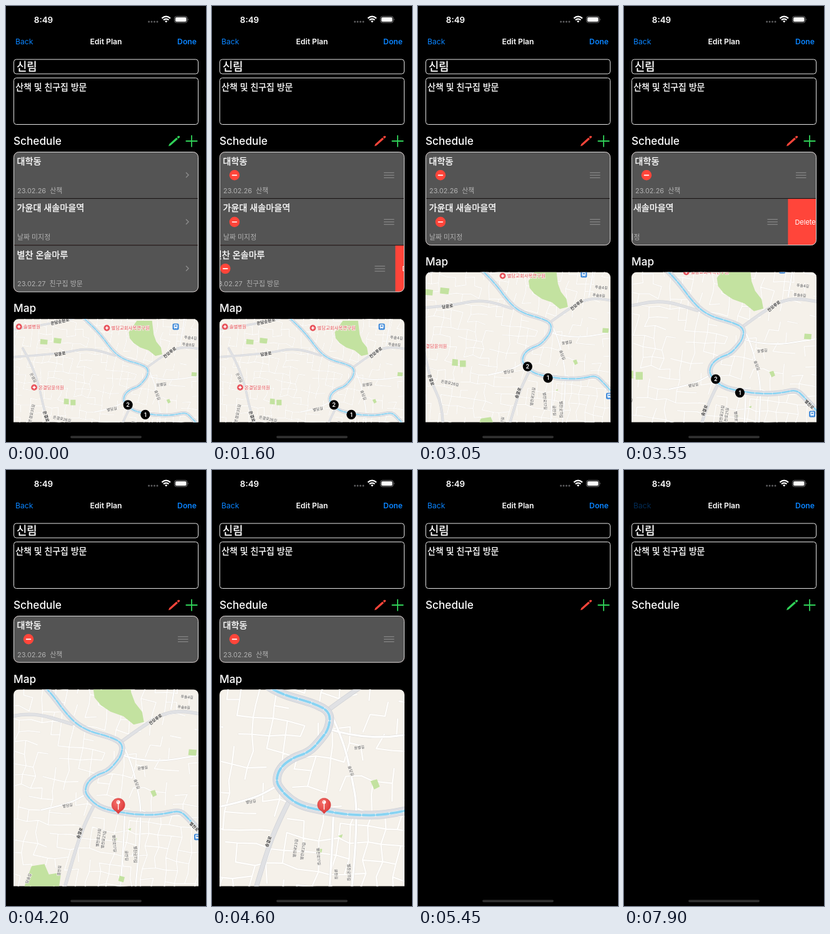
Recreate the animation shown at these times as an HTML page. Size 320x694 px, loop 8000 ms.

```html
<!DOCTYPE html>
<html lang="ko">
<head>
<meta charset="utf-8">
<style>
  html, body { margin: 0; width: 100%; height: 100%; overflow: hidden; background: #000; }
  svg { display: block; width: 100%; height: 100%; }
  text { font-family: Inter, "Noto Sans CJK KR", "Noto Sans CJK", sans-serif; fill: #fff; white-space: pre; }
  .bar { font-size: 12.2px; }
  .blue { fill: #0a84ff; }
  .bold { font-weight: 600; }
  .heading { font-size: 17.2px; font-weight: 500; }
  .medium { stroke: #fff; stroke-width: 0.35px; }
  .title { font-size: 14.1px; }
  .detail { font-size: 10.9px; fill: #b2b2b2; }
  .field { fill: none; stroke: #e4e4e4; }
  .lines { fill: none; stroke-linejoin: round; stroke-linecap: round; }
  .label text { font-size: 6px; fill: #55565a; text-anchor: middle; paint-order: stroke; stroke: #f8f5ef; stroke-width: 1.4px; }
  .label .major { font-size: 6.6px; font-weight: 600; fill: #3c3d40; }
  .label .place { font-size: 7.4px; font-weight: 500; text-anchor: start; }
</style>
</head>
<body>
<svg viewBox="0 0 320 694">
  <defs>
    <clipPath id="viewport"><rect width="320" height="662.5"/></clipPath>
    <clipPath id="cardClip"><rect class="cardBox" x="12.5" y="232.5" width="295" rx="8"/></clipPath>
    <clipPath id="mapClip"><rect id="mapBox" x="12" width="296" height="372" rx="8"/></clipPath>
    <radialGradient id="balloonFill" cx=".4" cy=".3" r=".8">
      <stop offset="0" stop-color="#f4706a"/><stop offset="1" stop-color="#d92f30"/>
    </radialGradient>
  </defs>
  <rect width="320" height="694"/>

  <text x="60" y="26.6" font-size="13.4" text-anchor="middle" class="bold">8:49</text>
  <g fill="#5c5c5e">
    <circle cx="228.6" cy="25" r="1.5"/><circle cx="233" cy="25" r="1.5"/>
    <circle cx="237.5" cy="25" r="1.5"/><circle cx="242" cy="25" r="1.5"/>
  </g>
  <g fill="none" stroke="#fff" stroke-width="2.1">
    <path d="M249.4 19.6Q256.2 13.8 263 19.6M251.9 22.3Q256.2 18.8 260.5 22.3"/>
    <path d="M254 23.9Q256.2 22.4 258.4 23.9L256.2 26.5Z" fill="#fff" stroke="none"/>
  </g>
  <rect x="269.5" y="16.5" width="20.5" height="10" rx="3.2" fill="none" stroke="#7b7b7d"/>
  <rect x="271" y="18" width="17.5" height="7" rx="1.8" fill="#fff"/>
  <path d="M291.3 19.8Q293 21.5 291.3 23.2Z" fill="#7b7b7d"/>

  <text id="back" x="15" y="61" class="bar blue">Back</text>
  <text x="160" y="61" text-anchor="middle" class="bar bold">Edit Plan</text>
  <text x="305" y="61" text-anchor="end" class="bar bold blue">Done</text>

  <rect class="field" x="12.5" y="85" width="295" height="23" rx="4"/>
  <text x="17" y="102.8" font-size="17.7" class="medium">신림</text>
  <rect class="field" x="12.5" y="114.5" width="295" height="74" rx="4"/>
  <text x="15.3" y="134.2" font-size="13.9" class="medium">산책 및 친구집 방문</text>

  <text x="12" y="221" class="heading">Schedule</text>
  <path id="pencil" d="M260 223.2L261.2 219.8L272.6 209.4L275 211.8L263.4 222ZM273.5 208.6L275.4 207Q277 206.2 278 207.6Q278.6 209 277.6 209.6L275.9 211Z"/>
  <path d="M288.3 215H305.7M297 206.3V223.7" stroke="#30d158" stroke-width="1.8" stroke-linecap="round"/>

  <g id="content" clip-path="url(#viewport)">
    <g id="rows" clip-path="url(#cardClip)"></g>
    <rect class="cardBox" x="12.5" y="232.5" width="295" rx="8" fill="none" stroke="#dcdcdc"/>
    <text id="mapHeading" x="12" class="heading">Map</text>
    <g clip-path="url(#mapClip)">
      <rect width="320" height="694" fill="#f5f1ea"/>
      <g id="terrain"></g>
      <g id="labels"></g>
      <g id="pins"></g>
    </g>
  </g>
  <rect x="103" y="684.3" width="114" height="3.6" rx="1.8" fill="#303030"/>
</svg>

<script>
const LOOP = 8000, ROW_HEIGHT = 74.4, CARD_TOP = 232, DELETE_WIDTH = 56;
const RED = '#ff453a', GREEN = '#30d158';
const $ = id => document.getElementById(id);
const clamp = v => Math.min(1, Math.max(0, v));
const easeInOut = v => (1 - Math.cos(Math.PI * clamp(v))) / 2;
const spring = ms => { const k = Math.max(0, ms) * 0.014; return 1 - (1 + k) * Math.exp(-k); };

function add(parent, tag, attrs, text = '') {
  const node = document.createElementNS('http://www.w3.org/2000/svg', tag);
  for (const key in attrs) node.setAttribute(key, attrs[key]);
  node.textContent = text;
  return parent.appendChild(node);
}
const move = (node, x, y, angle = 0) =>
  node.setAttribute('transform', `translate(${x.toFixed(2)} ${y.toFixed(2)}) rotate(${angle})`);
const show = (node, visible) => node.setAttribute('display', visible ? 'inline' : 'none');

// ---- Schedule rows ----
const rows = [
  { title: '대학동', detail: '23.02.26  산책', swipe: 4760, remove: 5450 },
  { title: '가윤대 새솔마을역', detail: '날짜 미지정', swipe: 3330, remove: 4000 },
  { title: '별찬 온솔마루', detail: '23.02.27  친구집 방문', swipe: 1530, remove: 2350 },
];
rows.forEach((row, i) => {
  row.node = add($('rows'), 'g', {});
  move(row.node, 0, CARD_TOP + i * ROW_HEIGHT);
  add(row.node, 'rect', { x: 12, width: 296, height: ROW_HEIGHT, fill: RED });
  row.body = add(row.node, 'g', {});
  add(row.body, 'rect', { x: 12, width: 296, height: ROW_HEIGHT, fill: '#545454' });
  add(row.body, 'text', { x: 17.5, y: 20, class: 'title medium' }, row.title);
  add(row.body, 'text', { x: 18, y: 65.5, class: 'detail' }, row.detail);
  row.chevron = add(row.body, 'path', { d: 'M288 33L292 37L288 41', fill: 'none', stroke: '#8c8c8c', 'stroke-width': 1.4 });
  row.minus = add(row.body, 'g', {});
  add(row.minus, 'circle', { cx: 36, cy: 37.3, r: 8.2, fill: RED });
  add(row.minus, 'rect', { x: 31.8, y: 36.5, width: 8.4, height: 1.7, rx: 0.8, fill: '#fff' });
  row.handle = add(row.body, 'path', { d: 'M275 33.3H291.5M275 37.3H291.5M275 41.3H291.5', stroke: '#858585', 'stroke-width': 1.2 });
  row.delete = add(row.node, 'text', { x: 319, y: 41.3, 'font-size': 11 }, 'Delete');
  if (i) add(row.node, 'rect', { x: 12, y: -0.5, width: 296, height: 1, fill: '#111' });
});

// ---- Map terrain ----
function smooth(points) {
  let d = `M${points[0]}`;
  for (let i = 1; i < points.length - 1; i++) {
    const [x, y] = points[i], [nx, ny] = points[i + 1];
    d += `Q${x} ${y} ${(x + nx) / 2} ${(y + ny) / 2}`;
  }
  return d + `L${points.at(-1)}`;
}

function streets() {
  let seed = 11;
  const random = () => (seed = (seed * 16807) % 2147483647) / 2147483647;
  const columns = 32, count = 29, step = 17, nodes = [];
  for (let r = 0; r < count; r++) for (let c = 0; c < columns; c++) {
    const u = -175 + c * step, v = 270 + r * step;
    nodes.push([u + (v - 480) * -0.13 + random() * 7, v + (u - 100) * 0.12 + random() * 7]);
  }
  let d = '';
  nodes.forEach(([x, y], i) => {
    const sparse = x > 190 && y > 405 && y < 540;
    const density = sparse ? 0.27 : y > 550 && x > 135 ? 0.8 : 0.57;
    const link = j => { if (nodes[j] && random() < density) d += `M${x} ${y}L${nodes[j]}`; };
    if ((i + 1) % columns) link(i + 1);
    link(i + columns);
  });
  return d;
}

const river = smooth([[-12, 275], [25, 310], [71, 353], [104, 398], [130, 417], [168, 427], [187, 437], [185, 455],
  [176, 467], [164, 480], [146, 486], [132, 497], [128, 511], [133, 520], [144, 531], [157, 538], [175, 542],
  [192, 545], [206, 547], [236, 548], [257, 545], [276, 541], [290, 554], [325, 592]]);
const avenues = [
  [[143, 531], [128, 560], [114, 600], [98, 655], [88, 690]],
  [[184, 435], [215, 412], [262, 384], [325, 394]],
  [[-140, 411], [-20, 403], [45, 388], [108, 407]],
  [[-140, 346], [-50, 334], [40, 312]],
  [[-110, 390], [-78, 447], [-57, 549], [-32, 600], [-30, 680]],
].map(smooth).join('');
const lanes = [
  [[188, 440], [200, 466], [209, 502], [217, 546], [206, 670]],
  [[184, 455], [225, 468], [310, 455]],
  [[60, 540], [100, 532], [130, 516]],
  [[190, 548], [188, 600], [182, 675]],
  [[262, 384], [268, 350], [275, 300]],
].map(smooth).join('');
const parks = 'M160 325H196L200 358L206 374L217 388L220 404L204 408L188 395L168 388L153 378L143 366L141 352Z'
  + 'M-36 365l18 2l-2 12l-17 -2ZM-68 368l17 2l-1 11l-17 -1ZM-12 508l11 1v13l-12 -1ZM3 511h12v13h-12Z'
  + 'M290 446l12 1l-1 9l-12 -1ZM45 627L65 624L72 640L91 637L86 672H29Z'
  + 'M230 511l7 -2l3 8l-6 3ZM173 583l5 1l-1 4l-5 -1ZM195 570l5 -2l-1 4ZM182 642l8 2l-2 8l-8 -2Z';

const stroke = (d, color, width, extra) =>
  add($('terrain'), 'path', { d, class: 'lines', stroke: color, 'stroke-width': width, ...extra });
const streetPath = streets();
stroke(streetPath, '#e9e5df', 2.3);
stroke(streetPath, '#fffefc', 1.6);
stroke(lanes, '#e3e0dc', 3);
stroke(lanes, '#fff', 2.2);
add($('terrain'), 'path', { d: parks, fill: '#c3e2a0' });
stroke(avenues, '#cfd1d5', 5.2);
stroke(avenues, '#e0e1e4', 4.2);
stroke(river, '#cdd0d6', 9.2);
stroke(river, '#dcdee3', 8.2);
stroke(river, '#f6f6f7', 3.2);
stroke(river, '#88d3f2', 2.7, { 'stroke-dasharray': '12.3 2.7', 'stroke-linecap': 'butt' });

// ---- Map labels: text, x, y, angle, smallest zoom, class ----
const labels = [
  ['온담순환로', -22, 327, -12, 0, 'major'], ['담윤로', -22, 403, -9, 0, 'major'],
  ['잔모루로', 238, 400, -38, 0, 'major'], ['온결로', -55, 550, 72, 0, 'major'],
  ['솜결로', 120, 576, -70, 0, 'major'], ['별찬로', 298, 566, 45, 0.9, 'major'],
  ['푸솔4길', 287, 365, 5, 0], ['푸솔8길', 282, 381, 5, 0], ['온샘길', -85, 459, 62, 0],
  ['온결로35길', -89, 543, -78, 0], ['온결로26길', -17, 556, 12, 0], ['볕담길', 101, 533, -10, 0],
  ['윤별길', 218, 475, -8, 0], ['솔담길', 209, 500, 70, 0], ['별찬로23길', 149, 583, -82, 0],
  ['별찬로21길', 157, 586, -82, 0.9], ['별찬로17길', 174, 592, 86, 0], ['글찬길', 193, 611, 88, 0],
  ['별찬로11길', 207, 609, 90, 0], ['결찬길', 88, 634, -84, 0], ['담솔길', 40, 646, -68, 0],
  ['모담길', 122, 486, -42, 1.5], ['별찬로28길', 179, 522, 8, 1.5], ['솔담7길', 227, 505, -18, 1.5],
  ['솔담3길', 232, 518, 58, 1.5], ['솜결로26길', 166, 550, 4, 1.5], ['솜결로24길', 161, 565, 5, 1.5],
  ['솜결로26가길', 133, 571, -68, 1.5], ['글찬5길', 214, 570, 3, 1.5], ['글찬7길', 214, 585, 3, 1.5],
].map(([text, x, y, angle, minZoom, type = '']) => {
  const node = add($('labels'), 'g', { class: 'label' });
  add(node, 'text', { y: 2.2, class: type }, text);
  return { node, x, y, angle, minZoom };
});

function addPlace(text, x, y, color, minZoom = 0) {
  const node = add($('labels'), 'g', { class: 'label' });
  add(node, 'circle', { r: 4.9, fill: color });
  add(node, 'path', { d: 'M-2.4 0H2.4M0 -2.4V2.4', stroke: '#fff', 'stroke-width': 1.6 });
  add(node, 'text', { x: 7, y: 2.8, class: 'place', style: `fill:${color}` }, text);
  labels.push({ node, x, y, angle: 0, minZoom });
}
addPlace('솔별병원', -119, 339, '#e8545c');
addPlace('별담교회사목연구원', 89, 342, '#e8545c');
addPlace('온결담윤의원', -83, 482, '#e8545c');
addPlace('담윤누리충전소', 145, 495, '#3f8ee0', 1.5);

for (const [x, y] of [[252, 339], [303, 582]]) {
  const node = add($('labels'), 'g', {});
  add(node, 'rect', { x: -5, y: -5, width: 10, height: 10, rx: 2, fill: '#3b87d9' });
  add(node, 'path', { d: 'M-2.5 -3H2.5V1.8H-2.5ZM-2 3.5L-1 2M2 3.5L1 2', fill: '#fff', stroke: '#fff', 'stroke-width': 0.8 });
  add(node, 'rect', { x: -1.6, y: -2, width: 3.2, height: 2, fill: '#3b87d9' });
  labels.push({ node, x, y, angle: 0, minZoom: 0 });
}

// ---- Map pins ----
function addNumberPin(text, x, y) {
  const node = add($('pins'), 'g', {});
  add(node, 'circle', { r: 7.6 });
  add(node, 'text', { y: 3.2, 'font-size': 9, 'text-anchor': 'middle', class: 'bold' }, text);
  return { node, x, y };
}
const numberPins = [addNumberPin('1', 180, 546), addNumberPin('2', 139, 523)];
const balloon = { node: add($('pins'), 'g', {}), x: 180, y: 546 };
add(balloon.node, 'path', { d: 'M0 0L-4 -4.3A10.6 10.6 0 1 1 4 -4.3Z', fill: 'url(#balloonFill)', stroke: '#c93434', 'stroke-width': 0.5 });
add(balloon.node, 'path', { d: 'M0 -17V-7', stroke: '#fff', 'stroke-width': 1.3, 'stroke-linecap': 'round' });
add(balloon.node, 'circle', { cy: -18.5, r: 2.9, fill: '#fff' });
add(balloon.node, 'circle', { cx: -0.7, cy: -19.2, r: 0.9, fill: '#e88' });

function drawMap(t, top, count) {
  const first = easeInOut((t - rows[2].remove) / 1500);
  const second = easeInOut((t - rows[1].remove) / 1500);
  const zoom = 0.676 * Math.exp(0.366 * first + 1.212 * second);
  const left = 160 - zoom * (87 + 73 * first + 20 * second);
  const offset = top + 186 - zoom * (596 - 62 * first + 12 * second);
  const place = ({ node, x, y, angle }) => move(node, left + x * zoom, offset + y * zoom, angle);

  $('mapBox').setAttribute('y', top);
  $('terrain').setAttribute('transform', `translate(${left} ${offset}) scale(${zoom})`);
  for (const label of labels) {
    show(label.node, zoom >= label.minZoom);
    place(label);
  }
  for (const pin of numberPins) {
    show(pin.node, count > 1);
    place(pin);
  }
  show(balloon.node, count === 1);
  place(balloon);
}

function drawRows(t, editing) {
  for (const row of rows) {
    const open = DELETE_WIDTH * spring(t - row.swipe);
    show(row.node, t < row.remove);
    move(row.body, -open, 0);
    row.delete.setAttribute('x', 308 - open + 11);
    row.chevron.setAttribute('opacity', 1 - editing);
    row.minus.setAttribute('opacity', editing);
    row.handle.setAttribute('opacity', editing);
    move(row.minus, -28 * (1 - editing), 0);
    move(row.handle, 28 * (1 - editing), 0);
  }
}

function draw() {
  const t = performance.now() % LOOP;
  const count = rows.filter(row => t < row.remove).length;
  const cardBottom = CARD_TOP + count * ROW_HEIGHT;

  $('pencil').setAttribute('fill', t >= 500 && t < 6850 ? RED : GREEN);
  $('back').setAttribute('opacity', t >= 7900 ? 0.33 : 1);
  show($('content'), count > 0);
  if (count) {
    document.querySelectorAll('.cardBox').forEach(box => box.setAttribute('height', cardBottom - CARD_TOP - 0.7));
    $('mapHeading').setAttribute('y', cardBottom + 32.2);
    drawRows(t, easeInOut((t - 470) / 230));
    drawMap(t, cardBottom + 43, count);
  }
  requestAnimationFrame(draw);
}
draw();
</script>
</body>
</html>
```
